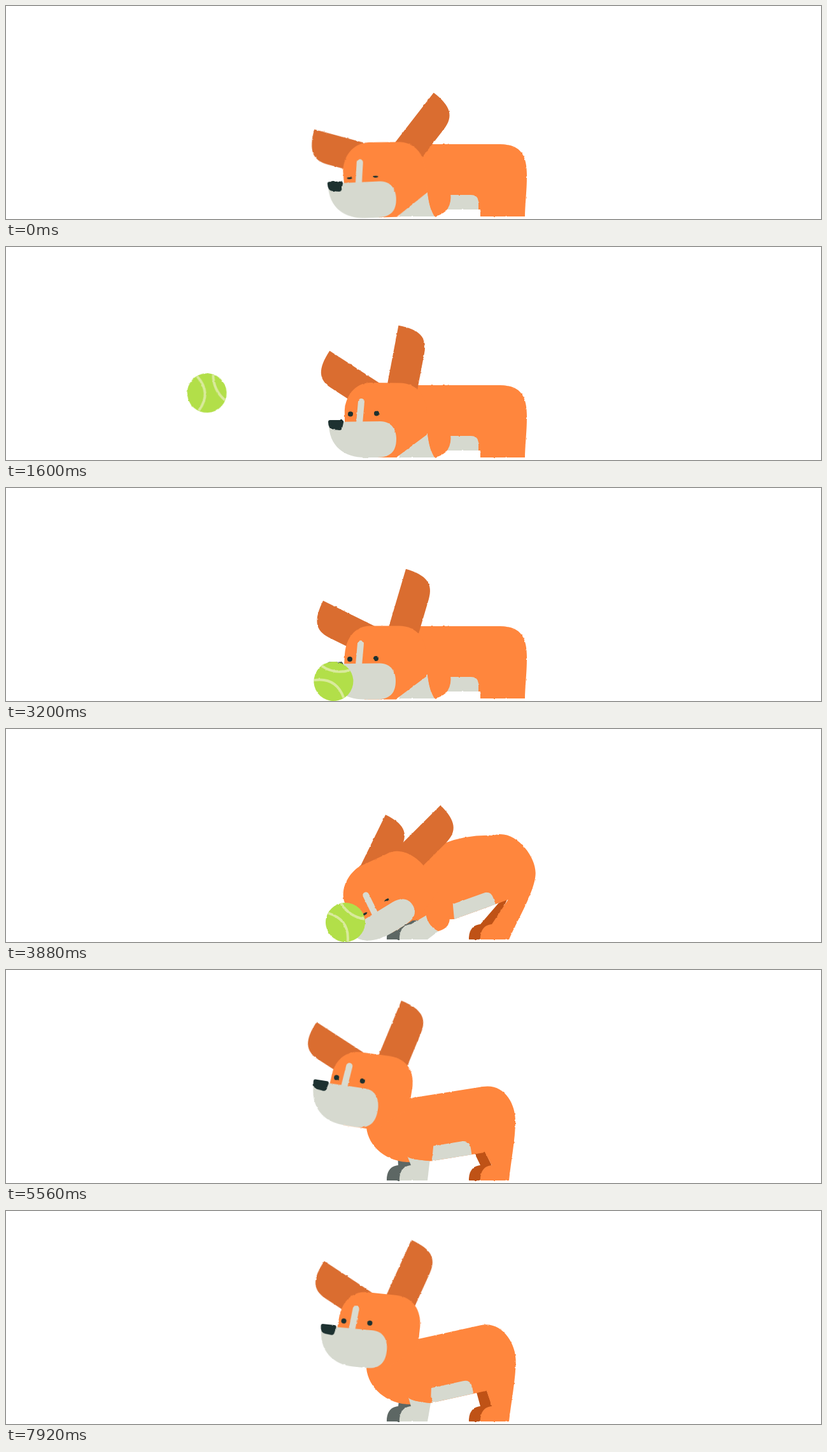
An HTML page for the animation above (8.96 s loop, 1280 px wide and 336 px high).

```html
<!DOCTYPE html>
<html lang="en">
<head>
<meta charset="utf-8">
<title>Dog and ball</title>
<style>
  html, body { margin: 0; width: 100%; height: 100%; overflow: hidden; background: #fff; }
  svg { display: block; width: 100vw; height: 100vh; }
  .fur { fill: #ff863d; }
  .ear { fill: #da6d30; }
  .pale { fill: #d6d9cf; }
  .ink { fill: #1d3130; }
  .blaze { fill: none; stroke: #d9dbd1; stroke-width: 10; stroke-linecap: round; }
  .seam { fill: none; stroke: #d9ea9c; stroke-width: 4; }
</style>
</head>
<body>
<svg viewBox="0 0 1280 336">
  <defs>
    <filter id="rough" filterUnits="userSpaceOnUse" x="0" y="0" width="1280" height="336" color-interpolation-filters="sRGB">
      <feTurbulence type="fractalNoise" baseFrequency=".2" seed="4"/>
      <feDisplacementMap in="SourceGraphic" scale="2.5" xChannelSelector="R" yChannelSelector="G"/>
    </filter>
    <path id="ear" class="ear" d="M-24 -124C10 -124 24 -114 24 -88V-24H-24Z"/>
  </defs>
  <g filter="url(#rough)">
    <path id="farHind" fill="#bf5216"/>
    <path id="farFront" fill="#5d6764"/>
    <path id="body" class="fur"/>
    <path id="patch" class="pale"/>
    <path id="leg" class="pale"/>
    <path id="shoulder" class="fur"/>
    <g id="head">
      <use id="leftEar" href="#ear"/>
      <use id="rightEar" href="#ear"/>
      <path id="skull" class="fur"/>
      <path class="blaze" d="M37 -3L40 -37"/>
      <ellipse id="leftEye" class="ink" cx="23" rx="4"/>
      <ellipse id="rightEye" class="ink" cx="64" rx="4"/>
      <path id="muzzle" class="pale"/>
      <path class="ink" d="M-12 -5Q-12 -8 -9 -8L10 -8Q13 -7 12 -4L10 5Q9 8 6 8L-4 7Q-12 6 -12 -5Z"/>
    </g>
    <g id="ball">
      <circle r="31" fill="#b2df49"/>
      <path class="seam" d="M14 -27Q-8 0 14 27"/>
      <path class="seam" transform="rotate(158)" d="M21 -22Q11 0 21 22"/>
    </g>
  </g>
</svg>
<script>
const LOOP = 8960, STEP = 40, FLOOR = 332;
const set = (id, attrs) => {
  for (const k in attrs) document.getElementById(id).setAttribute(k, attrs[k]);
};
const smooth = k => k * k * (3 - 2 * k);

// Body: a box hinged at its front belly corner (x, y), tilted rear up.
const lying = { x: 690, y: 321, tilt: 0, len: 128, arch: 0, spread: 0, knee: 662, elbowX: 673, elbowY: FLOOR };
const stand = { x: 667, y: 303, tilt: 12.5, len: 145, arch: 0, spread: 1, knee: 632, elbowX: 667, elbowY: 303 };
const rise = { ...stand, x: 662, y: 298, tilt: 3.3, len: 130, knee: 628, elbowX: 663, elbowY: 298 };
const crouch = { ...stand, x: 704, y: 300, tilt: 20, arch: 30, knee: 660, elbowX: 679, elbowY: 319 };
const bodyKeys = [[0, lying], [3240, lying], [3760, crouch], [4260, crouch], [4760, rise], [5080, rise],
  [5900, { ...stand, x: 673 }], [6280, { ...stand, x: 671 }], [7920, stand]];

// Head: placed by the nose; ear angles are relative to the head.
const watch = { x: 517, y: 282.5, tilt: 0, crown: 0, brow: 0, open: 1, chin: 58, earL: -63.7, side: 1, earR: 16.4 };
const sleepy = { ...watch, y: 285, tilt: -2, crown: -3, open: .35, earL: -73, earR: 39.7 };
const alert = { ...watch, x: 518, y: 281, crown: -2, brow: -5, earL: -57, earR: 10.7 };
const sniff = { ...watch, x: 550, y: 314.5, tilt: -31, crown: -16, open: .4, chin: 42, earL: 57, side: -.93, earR: 76 };
const rest = { ...watch, x: 506, y: 187, tilt: 6, brow: -3.5, chin: 61, earL: -62.5, earR: 18.3 };
const toss = { ...rest, x: 486, y: 175, tilt: 13, crown: 8, chin: 66, earL: -70.5, earR: 7 };
const look = { ...rest, x: 509, y: 191, tilt: 5, earL: -63.7, earR: 14.4 };
const headKeys = [[0, sleepy], [520, sleepy], [1000, alert], [1640, alert], [2320, watch], [3240, watch],
  [3760, sniff], [4260, sniff], [4760, toss], [5080, toss], [5960, { ...rest, x: 500 }], [6320, look], [6800, look], [7920, rest]];

function poseAt(keys, t) {
  const next = keys.findIndex(([time]) => time > t);
  if (next < 0) return keys[keys.length - 1][1];
  const [t0, a] = keys[next - 1], [t1, b] = keys[next];
  const k = smooth((t - t0) / (t1 - t0)), pose = {};
  for (const name in a) pose[name] = a[name] + (b[name] - a[name]) * k;
  return pose;
}

// Sole and rounded toe, ending at the ankle.
const foot = x => `${x} ${FLOOR}C${x} 316 ${x + 7} 309 ${x + 18} 308`;

function drawBody(t) {
  const { x, y, tilt, len, arch, spread, knee, elbowX, elbowY } = poseAt(bodyKeys, t);
  const c = Math.cos(tilt * Math.PI / 180), s = Math.sin(tilt * Math.PI / 180);
  const point = (u, v) => [x + u * c - v * s, y - u * s - v * c];
  const at = (u, v) => point(u, v).join(' ');
  const top = 103, thigh = len - 55, spot = len - 76;
  const rump = point(len, 55 - tilt * 1.5), heel = 815 - 25 * spread;

  set('body', { d: `M${at(-45, top)}Q${at(30, top + arch)} ${at(len - 42, top)}` +
    `C${at(len - 8, top)} ${rump[0]} ${rump[1] - 28} ${rump}` +
    `C${rump[0]} ${rump[1] + 28} ${heel + .3 * (rump[0] - heel)} 302 ${heel} ${FLOOR}` +
    `L${foot(745)}L${at(thigh, 0)}L${at(0, 0)}L640 ${y + 2}C600 ${y + 4} 569 280 566 248Z` });
  set('patch', { d: `M${at(0, 0)}L${at(6, 23)}L${at(spot - 12, 23)}Q${at(spot, 23)} ${at(spot, 11)}L${at(spot, 0)}Z` });
  set('farHind', { d: `M${foot(745 - 18 * spread)}L${at(thigh - 16 * spread, 0)}L${at(thigh, 2)}L766 315L748 ${FLOOR}Z` });
  set('farFront', { d: `M${foot(618 - 20 * spread)}L${knee - 15 * spread} 300L${knee + 5} 300L640 ${FLOOR}Z` });

  const shin = `${knee} 294Q${knee + 3} ${.7 * elbowY + 88} ${elbowX} ${elbowY}`;
  set('leg', { d: `M${foot(618)}L${shin}L662 ${FLOOR}Z` });
  set('shoulder', { d: `M${shin}Q${knee + 40} ${elbowY - 6} ${knee + 36} 294Z` });
}

function drawHead(t) {
  const { x, y, tilt, crown, brow, open, chin, earL, side, earR } = poseAt(headKeys, t);
  set('head', { transform: `translate(${x} ${y}) rotate(${tilt})` });
  set('leftEar', { transform: `translate(${60 + 16 * side} ${crown - 31}) rotate(${earL}) scale(${-side} .95)` });
  set('rightEar', { transform: `translate(99 ${crown - 29}) rotate(${earR})` });

  const top = crown - 65, rear = crown * .7 - 65, lift = Math.min(crown, 0), low = chin - 7;
  const cheek = k => chin * k - 6;
  set('skull', { d: `M14 -4L${15 + lift * .6} ${lift * 1.5 - 20}C${17 + lift * .5} ${top + 15} 35 ${top} 55 ${top}` +
    `L100 ${rear}C128 ${rear} 142 -45 143 -20V15L95 ${low}H45Z` });
  set('muzzle', { d: `M-11 -5L70 -6C88 -6 95 ${cheek(.24)} 95 ${cheek(.48)}C95 ${cheek(.83)} 85 ${low} 65 ${low}` +
    `H45C15 ${low} -12 ${cheek(.7)} -11 -5Z` });
  set('leftEye', { cy: brow - 12.5, ry: 4 * open });
  set('rightEye', { cy: brow - 13.5, ry: 4 * open });
}

const ENTER = 480, STOP = 3880, KICK = 4499, GRAVITY = .003, BOUNCE = .668;

function ballX(t) {
  if (t > KICK) return 533 - .8 * (t - KICK);
  const q = Math.max(0, STOP - t) / 2520;
  return 533 - 255 * q ** 2 - 16 * q ** 6;
}

function ballHeight(t) {
  let start = -291, hop = 1000;
  while (t > start + hop && hop > 150) {
    start += hop;
    hop *= BOUNCE;
  }
  return Math.max(0, GRAVITY / 2 * (t - start) * (start + hop - t));
}

function drawBall(t) {
  const x = ballX(t);
  const turn = t > KICK ? 1.28 : x < 434 ? 1.66 : 1.33;
  const spin = t > KICK ? 146 : 14;
  const from = t > KICK ? 533 : 434;
  set('ball', {
    transform: `translate(${x} ${305 - ballHeight(t)}) rotate(${spin + turn * (x - from)})`,
    visibility: t < ENTER || x < -36 ? 'hidden' : 'visible'
  });
}

function frame() {
  const t = Math.floor(performance.now() % LOOP / STEP) * STEP;
  drawBody(t);
  drawHead(t);
  drawBall(t);
  requestAnimationFrame(frame);
}
frame();
</script>
</body>
</html>
```
